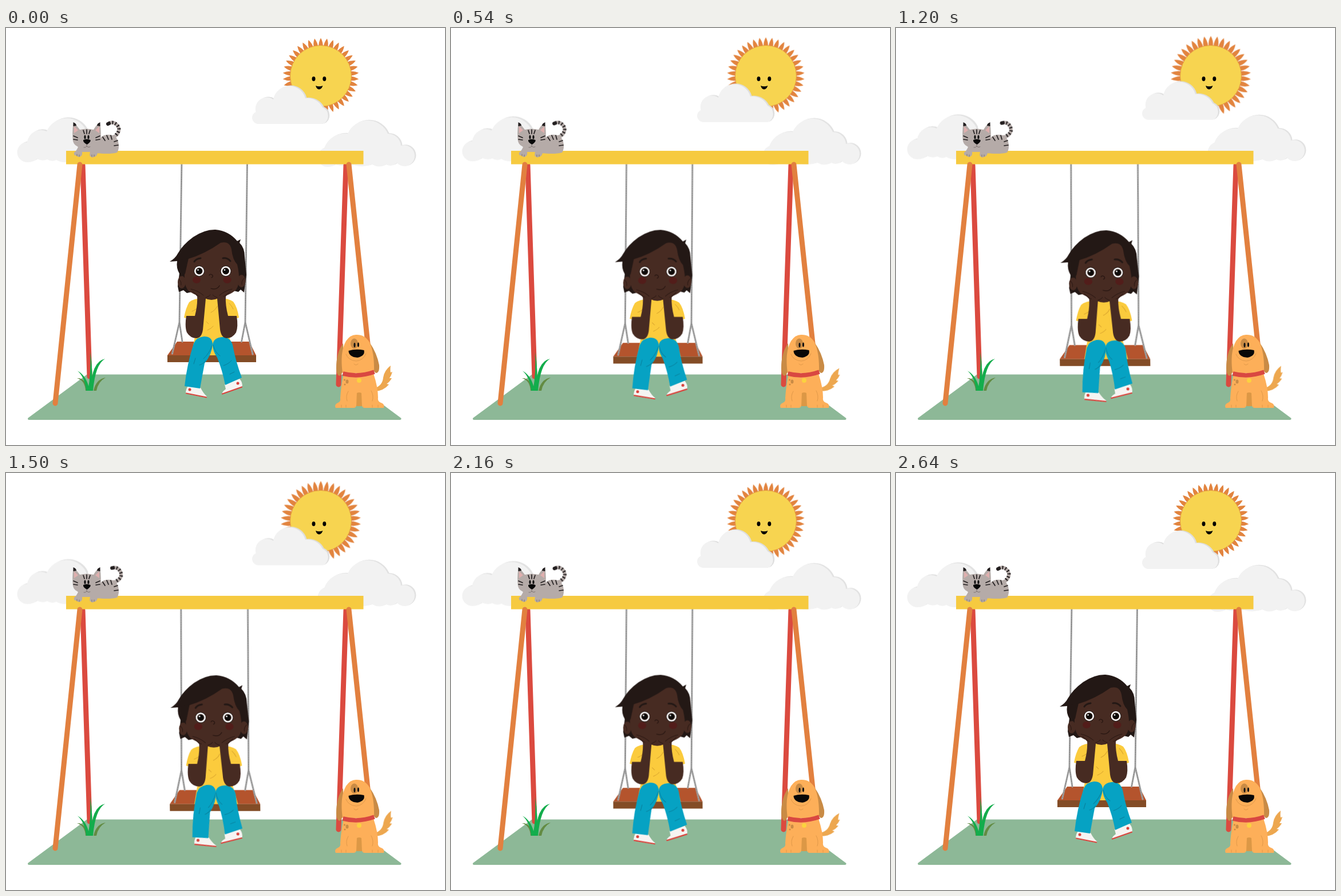
Write an HTML page that moves like this. It is 767 px wide and 730 px high and loops after 2700 ms.

```html
<!DOCTYPE html>
<html lang="en">
<head>
<meta charset="utf-8">
<title>Swing</title>
<style>
html, body { margin: 0; width: 100%; height: 100%; overflow: hidden; background: #fff; }
svg { display: block; width: 100%; height: 100%; }
.move { animation: 2700ms cubic-bezier(.37, 0, .63, 1) infinite; }
#rays { animation-name: shine; transform-origin: 550px 84px; }
#cloud-left { animation-name: float-left; }
#cloud-mid { animation-name: float-mid; }
#cloud-right { animation-name: float-right; }
#cat-tail { animation-name: curl; transform-origin: 187px 191px; }
#dog-tail { animation-name: wag; animation-duration: 1350ms; transform-origin: 648px 632px; }
#swing { animation-name: sway; transform-origin: 364.5px 238px; }
#head { animation-name: nod; }
#leg-left { animation-name: kick-left; transform-origin: 348px 548px; }
#leg-right { animation-name: kick-right; transform-origin: 377px 548px; }
@keyframes shine { 50% { transform: scale(1.055); } }
@keyframes float-left { 54% { transform: translateY(-5.7px); } }
@keyframes float-mid { 43% { transform: translateY(-7.3px); } }
@keyframes float-right { 50% { transform: translateY(-9.3px); } }
@keyframes curl { 53% { transform: rotate(17deg); } }
@keyframes wag { 50% { transform: rotate(10.5deg); } }
@keyframes sway {
  0%, 100% { transform: scale(1) skewX(0deg); }
  50% { transform: scale(1.02) skewX(1deg); }
}
@keyframes nod { 50% { transform: translateY(-1px); } }
@keyframes kick-left { 50% { transform: rotate(-5.7deg); } }
@keyframes kick-right { 50% { transform: rotate(5.6deg); } }
.line { fill: none; stroke-linecap: round; stroke-linejoin: round; }
.flat { stroke-linecap: butt; }
</style>
</head>
<body>
<svg viewBox="0 0 767 730">
  <defs>
    <path id="puff-left" d="M37 235A17.500 17.500 0 0 1 37 200A24 24 0 0 1 71 181A38 38 0 0 1 140 179L145 215L110 234Q98 237 88 231Q80 235 72 230Q64 234 54 229Q48 235 37 235Z"/>
    <path id="puff-mid" d="M440 168A11 11 0 0 1 436.500 147A20 20 0 0 1 467 125A28.700 28.700 0 0 1 523 123A30 30 0 0 1 553 139A16 16 0 0 1 554 168Z"/>
    <path id="puff-right" d="M562 243A17 17 0 0 1 556 210A38 38 0 0 1 597 185A38 38 0 0 1 667 185A23 23 0 0 1 690 206A18.500 18.500 0 1 1 698 242Q688 242 683 236Q675 244 664 239Q652 246 640 239Q624 245 608 240Q590 244 575 239Q570 243 562 243Z"/>
    <path id="ropes" d="M307 232L303 515L290.500 570M303 515L308 549M421.500 232L418 515L431 571M418 515L411.500 549"/>
    <g id="arm">
      <path fill="#472b22" d="M315 504Q312 523 316 533Q322 543 333 543Q342 542 344 528L349 474Q353 470 351 467Q345 468 341 465Q330 458 323 457Q328 464 334 470Q335 485 330 504Z"/>
      <path class="line" stroke="#2b1813" d="M323 457Q336 460 345 468M326 461Q333 468 338 470M349 472Q355 470 357 467"/>
    </g>
  </defs>

  <!-- sun -->
  <path id="rays" class="move" fill="#e2843f"/>
  <circle cx="550" cy="84" r="53.5" fill="#f7d450" stroke="#e39a40"/>
  <ellipse cx="537.5" cy="89" rx="3" ry="4"/>
  <ellipse cx="556.3" cy="89" rx="3" ry="4"/>
  <path d="M541 101Q547 103.500 553.500 101Q551 107.500 547 107.500Q543 107.500 541 101Z"/>

  <!-- clouds -->
  <g id="cloud-left" class="move">
    <use href="#puff-left" x="3" y="-1.500" fill="#e2e2e2"/>
    <use href="#puff-left" fill="#f2f2f2"/>
  </g>
  <g id="cloud-mid" class="move">
    <use href="#puff-mid" x="2.500" y="-1" fill="#dedede"/>
    <use href="#puff-mid" fill="#f2f2f2"/>
  </g>
  <g id="cloud-right" class="move">
    <use href="#puff-right" x="2.500" y="-1" fill="#e2e2e2"/>
    <use href="#puff-right" fill="#f2f2f2"/>
  </g>

  <!-- ground and far poles -->
  <path fill="#8db897" stroke="#8db897" stroke-width="4" stroke-linejoin="round" d="M142 608.500H587L688.500 684H40Z"/>
  <path class="line" stroke="#db4a3f" stroke-width="9" d="M134 240L146 610M594 240L581 624"/>

  <!-- swing -->
  <g id="swing" class="move">
    <path fill="#b4542d" d="M299 549H425L437 573H282Z"/>
    <path fill="#834c26" d="M282 573H437V585H282Z"/>
    <g class="line">
      <use href="#ropes" stroke="#a3a3a3" stroke-width="3"/>
      <use href="#ropes" stroke="#8b8b8b" stroke-width="1.200" stroke-dasharray="2 2"/>
    </g>

    <path fill="#fbcb3d" d="M345 473Q328 473 320 480Q314 490 311 507Q320 510 330 508V540L324 573H399L390 540V508Q400 510 407 507Q404 488 397 479Q389 473 372 473Z"/>
    <path fill="#472b22" d="M347 466H371V473Q359 479 347 473Z"/>
    <path class="line" stroke="#d9a52e" d="M325 496Q333 493 337 487M358 498Q366 494 369 487M352 529Q359 526 362 522M390 482Q395 487 397 492M350 514L354 518"/>

    <g id="leg-left" class="move">
      <path fill="#f6f4f2" d="M318 627L340 630Q345 640 351 645L349 647L314 640Q314 632 318 627Z"/>
      <path class="line" stroke="#d9433c" stroke-width="2.200" d="M315 639.500L350 646.500"/>
      <circle cx="321" cy="633" r="2.500" fill="#d9433c"/>
      <path fill="#06a2c3" d="M328 552Q333 541 346 540Q360 540 361 553Q360 571 347 587Q343 608 339 631L312 627Q316 589 328 552Z"/>
      <path class="line" stroke="#087f9b" d="M360 556Q355 570 345 579M338 590Q345 588 349 582M331 578L328 588"/>
    </g>
    <g id="leg-right" class="move">
      <path fill="#f6f4f2" d="M382 624L408 614Q414 621 412.500 628L378 641Q376 638 384 632Z"/>
      <path class="line" stroke="#d9433c" stroke-width="2.200" d="M378 640.500L412 628.500"/>
      <circle cx="405" cy="622" r="2.500" fill="#d9433c"/>
      <path fill="#06a2c3" d="M361 555Q362 542 378 541Q392 541 396 555Q401 583 412 612L383 625Q378 599 369 577Q361 565 361 555Z"/>
      <path class="line" stroke="#087f9b" d="M362 555Q365 568 374 574M380 591Q389 588 394 582M391 606L399 602"/>
    </g>

    <g id="head" class="move">
      <path fill="#231815" d="M286 409Q296 403 300 395Q309 379 327 366Q347 352.500 366 353Q389 355 404 373L410 370L408 376Q417 385 417 400L420 432L416 463L410 458L406 462L398 460L390 462H325L316 464L310 459L302 462L300 452L303 430Q297 420 299 408Z"/>
      <ellipse cx="307" cy="445" rx="7" ry="11" fill="#472b22"/>
      <ellipse cx="411.500" cy="443" rx="7" ry="11" fill="#472b22"/>
      <path class="line" stroke="#2b1813" d="M303 440Q307 445 306 450M416 438Q411 443 412 449"/>
      <path fill="#472b22" d="M316 405Q347 396 375 376Q391 372 394 388Q396 406 404 414Q412 449 400 460Q385 472 361 472Q336 472 320 461Q306 449 316 405Z"/>
      <path fill="#231815" d="M299 408Q308 405 319 403L313 430L306 435Z"/>
      <path class="line" stroke="#231815" stroke-width="3" d="M329 409Q332 404 340 403M379 403Q387 402 392 408"/>
      <ellipse cx="333" cy="441" rx="7" ry="6" fill="#521d1a"/>
      <ellipse cx="386.500" cy="441" rx="7" ry="6" fill="#521d1a"/>
      <g stroke="#231815">
        <circle cx="337.500" cy="425.500" r="9" fill="#fff"/>
        <circle cx="384" cy="425.500" r="9" fill="#fff"/>
      </g>
      <g fill="#0d0b0a" stroke="#3b251d">
        <circle cx="337.500" cy="425.500" r="5.500"/>
        <circle cx="384" cy="425.500" r="5.500"/>
      </g>
      <circle cx="335.500" cy="423.500" r="1.300" fill="#fff"/>
      <circle cx="382" cy="423.500" r="1.300" fill="#fff"/>
      <path class="line" stroke="#261511" stroke-width="1.200" d="M355 433Q357 429 361 433Q362 436 359 437M358 456Q369 459 373 451"/>
    </g>
    <use href="#arm"/>
    <use href="#arm" transform="translate(718) scale(-1 1)"/>
  </g>

  <!-- beam and near poles -->
  <path fill="#f6ca40" d="M105 215H624.500V238.500H105Z"/>
  <path class="line" stroke="#e2803f" stroke-width="9" d="M129 239L86 657M599 239L640 628"/>

  <!-- cat -->
  <g fill="#b5aba8">
    <g id="cat-tail" class="move line" stroke-width="6">
      <path stroke="#b5aba8" d="M186 191C196 189 200 178 195 171C190 165 184 164 178 168"/>
      <path class="flat" stroke="#231f20" stroke-dasharray="2 3.500" d="M192 187C198 181 199 175 195 171C190 165 184 164 178 168"/>
      <path stroke="#231f20" d="M180 167L178 168"/>
    </g>
    <path d="M160 200Q166 185 183 187Q197 190 197 207Q197 214 194 218Q180 222 150 218Z"/>
    <path d="M127 205H160V219Q158 226 154 225Q151 228 148 225Q145 224 147 217H133Q134 223 130 225Q126 227 123 223Q118 224 119 218Q124 215 127 205Z"/>
    <path d="M118 166Q124 171 129 178Q141 175 153 178Q157 170 164 166Q167 180 165 198Q163 207 152 209Q141 214 130 209Q119 207 117 198Q115 180 118 166Z"/>
    <path fill="#dfafae" d="M119 172L126 179L119 184ZM163 172L156 179L163 184Z"/>
    <path fill="#231f20" d="M117.500 165Q123 167 123 171L117.500 172ZM164.500 165Q159 167 159 171L164.500 172Z"/>
    <path class="line" stroke="#231f20" stroke-width="1.700" d="M135 179L137 185M141 178V185M147 179L145 185M118 189L125 192M118 195L125 196M164 189L157 192M164 195L157 196M169 191L173 197M176 188L179 195M183 188L185 195M195 197L189 199M196 205L189 206"/>
    <ellipse cx="138" cy="191" rx="1.600" ry="3.500" fill="#111"/>
    <ellipse cx="144" cy="191" rx="1.600" ry="3.500" fill="#111"/>
    <path fill="#080808" d="M135 196Q141 193 147.500 196Q149 199 141.500 204Q134 200 135 196Z"/>
    <path class="line" stroke="#7d7370" d="M141 204V207M136 209Q139 210 141 207Q144 210 147 208M124 224V221M128 225V222M150 225V222M154 225V222"/>
  </g>

  <!-- grass -->
  <path fill="#638b43" d="M139 635Q138 617 124 613Q139 612 144 635ZM153 635Q157 615 174 612Q161 619 158 635Z"/>
  <path fill="#13ad4c" d="M143 635Q149 604 147 567Q153 602 149 635ZM148 635Q149 584 173 579Q156 589 152 635ZM140 635Q138 612 125 600Q142 610 146 635Z"/>

  <!-- dog -->
  <g fill="#fdaf59">
    <path id="dog-tail" class="move" fill="#eda74f" d="M643 631Q658 626 659 612Q661 599 672 591Q671 599 672 603L675 602Q673 609 670 613L674 613Q670 620 665 623L669 624Q660 635 645 636Z"/>
    <path fill="#c98b45" d="M589 552Q577 568 577 596Q577 608 583 609Q590 604 590 590ZM635 550Q648 569 652 590Q653 604 646 604Q639 598 638 584Z"/>
    <path d="M590 605Q585 629 584 648Q585 654 580 656Q573 659 576 665H607Q612 665 612 660H622Q622 665 627 665H660Q662 658 655 656Q649 654 650 647Q650 629 642 605Z"/>
    <path fill="#dc9846" d="M613 639Q617 637 621 639L622 662H612Z"/>
    <path d="M588 604Q583 567 594 548Q602 536 613 537Q627 537 635 550Q644 568 643 604Z"/>
    <ellipse cx="608.500" cy="552.500" rx="6.500" ry="9" fill="#c98b45"/>
    <ellipse cx="609" cy="555" rx="1.500" ry="4" fill="#111"/>
    <ellipse cx="615.500" cy="554.500" rx="1.500" ry="4" fill="#111"/>
    <path fill="#080808" d="M598.500 565Q611 561 625.500 564Q628 574 614 577Q599 576 598.500 565Z"/>
    <path class="line" stroke="#e0994a" d="M594 571Q598 582 612 583Q624 582 629 570M608 588Q611 592 615 588M598 636Q593 644 596 653M638 635Q643 644 640 653M586 660V664M594 660V664M640 660V664M650 660V664"/>
    <path class="line flat" stroke="#d94841" stroke-width="7.500" d="M588.500 605Q616 612 643.500 602"/>
    <circle cx="617" cy="617" r="4" fill="#fbd23f"/>
    <g fill="#c98b45">
      <ellipse cx="596" cy="619" rx="2.500" ry="3.500"/>
      <circle cx="591.500" cy="616" r="1.500"/>
      <circle cx="592" cy="624" r="1.500"/>
    </g>
  </g>
</svg>
<script>
const COUNT = 38;
const polar = (r, a) => `${550 + r * Math.sin(a)} ${84 - r * Math.cos(a)}`;
const ray = (_, i) => {
  const a = i * 2 * Math.PI / COUNT;
  const p = (r, da) => polar(r, a + da);
  return `M${p(50, -.075)}Q${p(59, -.075)} ${p(66.5, 0)}Q${p(59, .075)} ${p(50, .075)}Z`;
};
document.getElementById('rays').setAttribute('d', Array.from({ length: COUNT }, ray).join(''));
</script>
</body>
</html>
```
